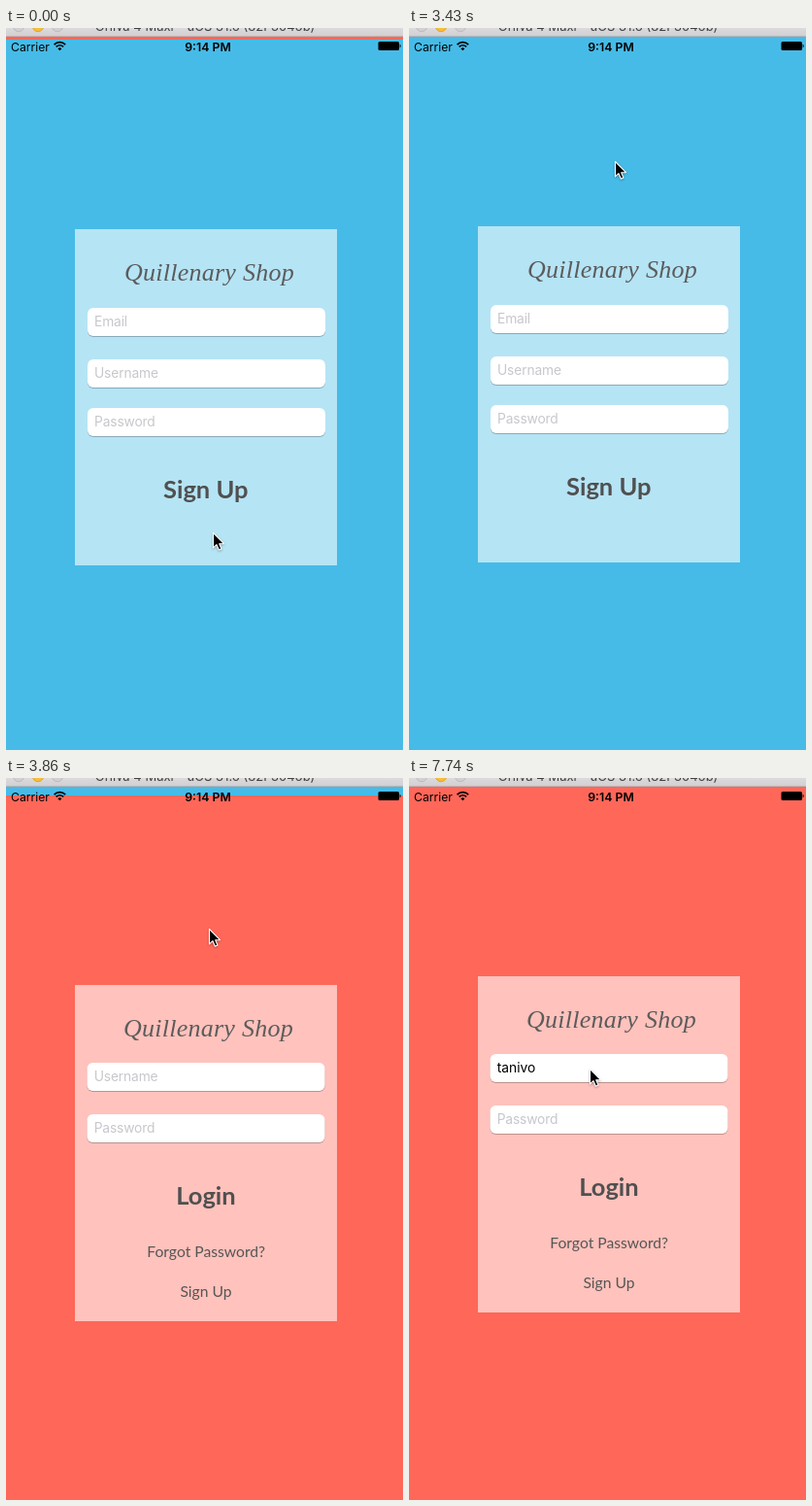
Write an HTML page that moves like this. It is 409 px wide and 743 px high and loops after 8000 ms.

```html
<!DOCTYPE html>
<html lang="en">
<head>
<meta charset="utf-8">
<title>Sign up and login</title>
<style>
  html, body { margin: 0; width: 100%; height: 100%; overflow: hidden; background: #ff6759; }
  svg { display: block; width: 409px; height: 743px; }
  text { font-family: Inter, sans-serif; font-size: 13.8px; white-space: pre; }
  .brand { font: italic 26px "Liberation Serif", serif; letter-spacing: .25px; fill: #5c5c5c; }
  .hint { fill: #c7c7cd; letter-spacing: -.15px; }
  .link, .action { font-family: Lato, sans-serif; font-size: 15.7px; fill: #565656; text-anchor: middle; }
  .action { font-size: 25.5px; font-weight: 700; fill: #505050; }
  .card { fill: #fff; fill-opacity: .6; }
  .status { font-size: 12.2px; }
  .clock { font-size: 12.3px; font-weight: 600; text-anchor: middle; }
  .window { font-size: 13px; fill: #404040; text-anchor: middle; }
</style>
</head>
<body>
<svg viewBox="0 0 409 743">
  <defs>
    <g id="field">
      <rect x="84" y="1" width="245" height="29" rx="6" fill="#000" fill-opacity=".25"/>
      <rect x="84" width="245" height="29" rx="6" fill="#fff"/>
    </g>
    <linearGradient id="chrome" x2="0" y2="1">
      <stop stop-color="#dcdadc"/><stop offset="1" stop-color="#d0ced0"/>
    </linearGradient>
  </defs>
  <rect width="409" height="743" fill="#ff6759"/>

  <g id="signup">
    <rect y="9" width="409" height="734" fill="#46bbe7"/>
    <rect class="card" x="71" y="204" width="270" height="346"/>
    <text class="brand" x="122" y="257">Quillenary Shop</text>
    <use href="#field" y="285"/><text class="hint" x="91" y="304">Email</text>
    <use href="#field" y="338"/><text class="hint" x="91" y="357">Username</text>
    <use href="#field" y="388"/><text class="hint" x="91" y="407">Password</text>
    <text class="action" x="205.7" y="480.5">Sign Up</text>
  </g>

  <g id="login">
    <rect y="9" width="409" height="735" fill="#ff6759"/>
    <rect class="card" x="71" y="204" width="270" height="346"/>
    <text class="brand" x="121" y="257">Quillenary Shop</text>
    <use href="#field" x="-.5" y="284"/>
    <text class="hint" id="hint" x="90.7" y="303">Username</text>
    <text id="typed" x="90.7" y="303"></text>
    <use href="#field" x="-.5" y="337"/><text class="hint" x="90.7" y="356">Password</text>
    <rect id="caret" width="2" height="18" fill="#4269dc"/>
    <text class="action" x="206" y="429.5">Login</text>
    <text class="link" x="206.2" y="484">Forgot Password?</text>
    <text class="link" x="206" y="525">Sign Up</text>
  </g>

  <g id="chromebar">
    <rect width="409" height="9" fill="url(#chrome)"/>
    <rect y="8" width="409" height="1" fill="#b9b4b6"/>
    <g stroke-width="1">
      <circle cx="13" cy="-2" r="5.7" fill="#d2d0d2" stroke="#bdbbbd"/>
      <circle cx="33" cy="-2" r="5.7" fill="#f6be3c" stroke="#dfa631"/>
      <circle cx="53" cy="-2" r="5.7" fill="#d2d0d2" stroke="#bdbbbd"/>
    </g>
    <text class="window" x="205" y="3">Orliva 4 Maxi – uOS 31.6 (82F3046b)</text>
  </g>

  <g id="statusbar">
    <text class="status" x="5" y="24">Carrier</text>
    <g fill="none" stroke="#000" stroke-width="1.7">
      <path d="M49.6 17.1a8 8 0 0 1 11.6 0M51.7 19.3a5.2 5.2 0 0 1 7.4 0"/>
      <path d="M55.4 23.3l-2-2a2.9 2.9 0 0 1 4 0z" fill="#000" stroke="none"/>
    </g>
    <text class="clock" x="208" y="24">9:14 PM</text>
    <rect x="383.5" y="14" width="21.5" height="9" rx="1.5"/>
    <path d="M405.6 16.5a2.4 2.4 0 0 1 0 4z"/>
  </g>

  <path id="cursor" d="M0 0V15.4L3.5 12.2L5.9 17.7L8.5 16.6L6.2 11.2H11Z"
        stroke="#fff" stroke-width="1.1" stroke-linejoin="round"
        style="filter: drop-shadow(0 1px 1px rgba(0,0,0,.3))"/>
</svg>
<script>
const LOOP = 8000, HEIGHT = 734, USER = "tanivo";
const $ = id => document.getElementById(id);
const [signup, login, hint, typed, caret, cursor] =
  ["signup", "login", "hint", "typed", "caret", "cursor"].map($);

// [time, x, y]: the pointer holds each place until the next time
const pointer = [
  [0, 213, 519], [450, 212, 515], [600, 210, 505], [750, 207, 495],
  [890, 207, 488], [1040, 207, 484], [1340, 207, 478], [1490, 209, 473],
  [2540, 211, 463], [2980, 211, 440], [3130, 212, 300], [3270, 212, 170],
  [3420, 212, 137], [3860, 209, 155], [4010, 204, 184], [4160, 201, 205],
  [4310, 194, 245], [4460, 188, 285], [4610, 186, 299]
];
// [time, opacity]
const blink = [[0, 0], [4910, 1], [5360, .5], [5510, 0], [5660, 1], [7590, .5], [7740, 0]];
const keys = [5660, 5800, 5950, 6100, 6250, 6400];
const slideTicks = [[0], [3570], [3720], [3860], [4010]];

const held = (steps, t) => steps.findLast(s => s[0] <= t);

function slide(t) {
  const tick = held(slideTicks, t)[0];
  if (tick === 0) return HEIGHT;
  if (tick === 4010) return 0;
  const p = (tick - 3486) * 0.01703;
  return Math.round(HEIGHT * (1 + p) * Math.exp(-p));
}

const moveTo = (el, x, y) => el.setAttribute("transform", `translate(${x} ${y})`);

function render(t) {
  moveTo(signup, 0, t < 150 ? 3 : 0);
  moveTo(login, 0, slide(t));
  const [, x, y] = held(pointer, t);
  moveTo(cursor, x + .5, y + .5);

  const text = USER.slice(0, keys.filter(k => k <= t).length);
  if (typed.textContent !== text) typed.textContent = text;
  hint.style.visibility = text ? "hidden" : "visible";

  const inPassword = t >= 7300;
  const end = text && !inPassword ? typed.getComputedTextLength() : 0;
  moveTo(caret, 91 + Math.round(end), inPassword ? 341 : 289);
  caret.style.opacity = held(blink, t)[1];
}

const start = performance.now();
(function frame() {
  render((performance.now() - start) % LOOP);
  requestAnimationFrame(frame);
})();
</script>
</body>
</html>
```
